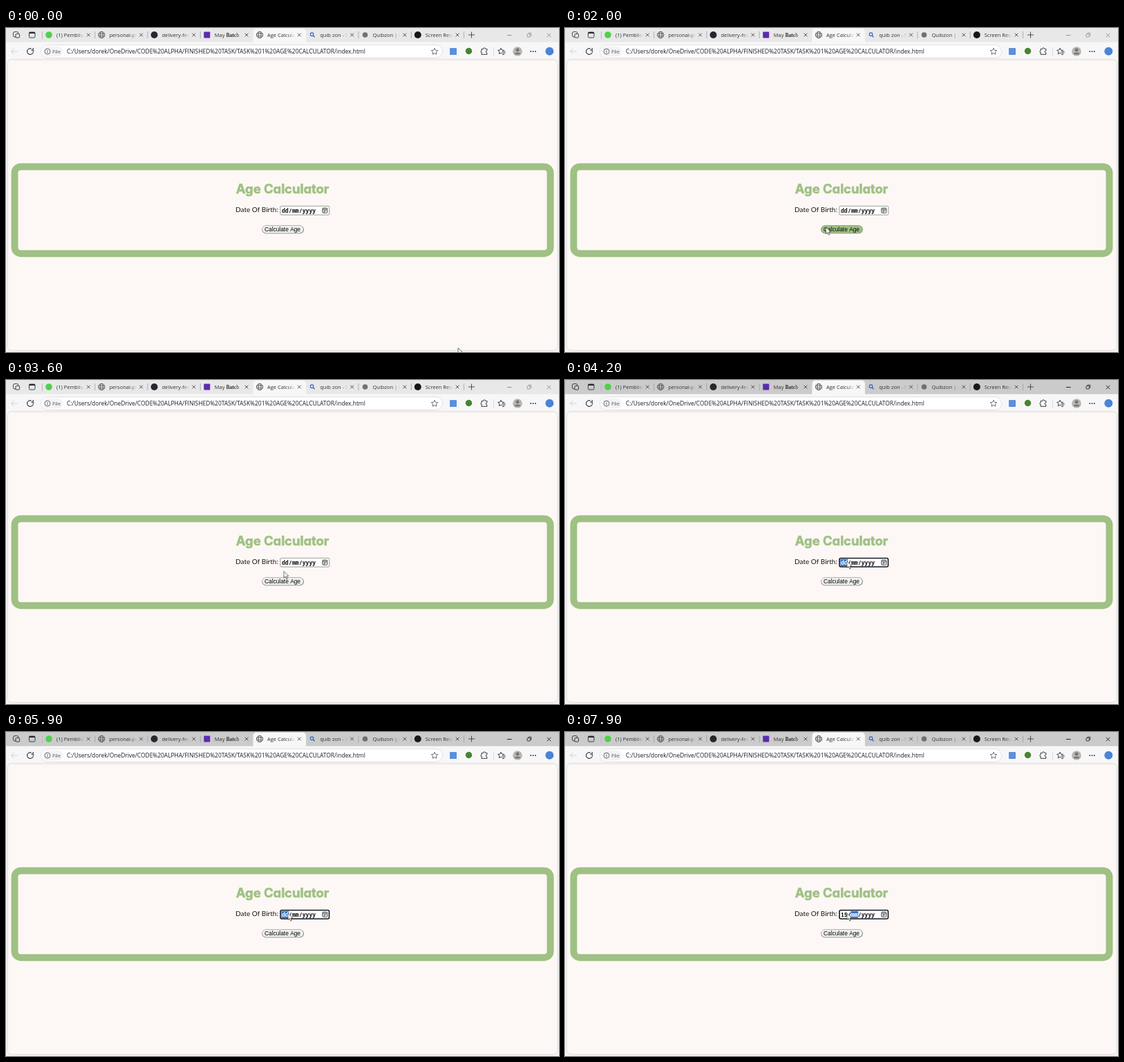
An HTML page with a canvas for the animation above (8 s loop, 800 px wide and 470 px high).

```html
<!DOCTYPE html>
<html lang="en">
<head>
<meta charset="utf-8">
<title>Age Calculator</title>
<style>
html, body { margin: 0; width: 100%; height: 100%; overflow: hidden; background: #f7f7f7; }
canvas { display: block; width: 800px; height: 470px; }
h1 {
  position: absolute; left: 0; top: 221px; width: 800px; margin: 0;
  font: 700 18.4px/24px Inter, "Open Sans", sans-serif;
  font-feature-settings: "cv11", "ss03";
  color: #9fc184; -webkit-text-stroke: 0.6px #9fc184; text-align: center;
}
</style>
</head>
<body>
<canvas id="stage"></canvas>
<h1>Age Calculator</h1>
<script>
const LOOP = 8000, STEP = 100;
const FOCUS_AT = 4000, FIRST_KEY = 7300, SECOND_KEY = 7600;
const UI = '"Open Sans", "Noto Sans", sans-serif';
const MONO = '"Noto Sans Mono", "DejaVu Sans Mono", monospace';
const GREEN = '#9fc184', PAGE = '#fdf8f5', BAR = '#f7f7f7', INK = '#2b2b2b';

const canvas = document.getElementById('stage');
const c = canvas.getContext('2d');
const dpr = window.devicePixelRatio || 1;
canvas.width = 800 * dpr;
canvas.height = 470 * dpr;

function box(x, y, w, h, r, fill, stroke, lw = 1) {
  c.beginPath();
  c.roundRect(x, y, w, h, r);
  if (fill) { c.fillStyle = fill; c.fill(); }
  if (stroke) { c.strokeStyle = stroke; c.lineWidth = lw; c.stroke(); }
}

function disc(x, y, r, fill, stroke, lw = 1) {
  c.beginPath();
  c.arc(x, y, r, 0, Math.PI * 2);
  if (fill) { c.fillStyle = fill; c.fill(); }
  if (stroke) { c.strokeStyle = stroke; c.lineWidth = lw; c.stroke(); }
}

// Each argument after the width is one polyline: [x0, y0, x1, y1, ...]
function lines(color, lw, ...paths) {
  c.strokeStyle = color;
  c.lineWidth = lw;
  c.beginPath();
  for (const p of paths) {
    c.moveTo(p[0], p[1]);
    for (let i = 2; i < p.length; i += 2) c.lineTo(p[i], p[i + 1]);
  }
  c.stroke();
}

function text(str, x, y, font, color, align = 'left') {
  c.font = font;
  c.fillStyle = color;
  c.textAlign = align;
  c.fillText(str, x, y);
}

function cross(x, y, r, color, lw) {
  lines(color, lw, [x - r, y - r, x + r, y + r], [x + r, y - r, x - r, y + r]);
}

function globe(x, y) {
  disc(x, y, 4.6, null, '#4a4a4a', 0.9);
  c.beginPath();
  c.ellipse(x, y, 2, 4.6, 0, 0, Math.PI * 2);
  c.stroke();
  lines('#4a4a4a', 0.8, [x - 4.2, y - 1.6, x + 4.2, y - 1.6], [x - 4.2, y + 1.6, x + 4.2, y + 1.6]);
}

function lens(x, y) {
  disc(x - 0.7, y - 0.8, 2.3, null, '#2468c4', 1.1);
  lines('#2468c4', 1.3, [x + 1, y + 1, x + 3.2, y + 3.2]);
}

function star(x, y, r, color) {
  c.beginPath();
  for (let i = 0; i < 10; i++) {
    const a = i * Math.PI / 5 - Math.PI / 2, q = i % 2 ? r * 0.48 : r;
    c.lineTo(x + q * Math.cos(a), y + q * Math.sin(a));
  }
  c.closePath();
  c.strokeStyle = color;
  c.lineWidth = 0.9;
  c.stroke();
}

const dot = (color, r) => (x, y) => disc(x, y, r, color);

const tabs = [
  ['(1) Pemblio', dot('#4fd14b', 4.8)],
  ['personal-portfolio', globe],
  ['delivery-fee', dot('#24292f', 5)],
  ['May ', (x, y) => box(x - 4.5, y - 4.5, 9, 9, 1, '#5b2bb0'), 'Batch'],
  ['Age Calculator', globe],
  ['quib zon - Search', lens],
  ['Quibzon | Chat', dot('#707070', 3.8)],
  ['Screen Recorder', dot('#171717', 5)]
];

function tabStrip(focused) {
  const strip = focused ? '#cbcbcb' : '#e8e8e8';
  c.fillStyle = strip;
  c.fillRect(0, 0, 800, 21);

  box(10.5, 5.5, 7.5, 7.5, 2.4, null, INK, 0.9);
  box(14, 8.5, 5.6, 5.6, 1.3, strip, INK, 0.9);
  box(33.5, 6, 8.5, 8, 1.5, null, INK, 0.9);
  c.fillStyle = INK;
  c.fillRect(33.5, 6, 8.5, 2);
  lines('#b0b0b0', 0.8, [52.5, 5, 52.5, 16]);

  box(357.5, 0.5, 76.5, 26, 5, BAR);

  tabs.forEach(([label, icon, bold], i) => {
    const x = 62 + i * 76.25, tx = x + 11;
    icon(x, 10);
    c.save();
    c.beginPath();
    c.rect(tx, 0, 40, 20);
    c.clip();
    const fade = c.createLinearGradient(tx + 30, 0, tx + 40, 0);
    fade.addColorStop(0, '#303030');
    fade.addColorStop(1, 'rgba(48,48,48,0)');
    text(label, tx, 13, '7.5px ' + UI, fade);
    if (bold) text(bold, tx + c.measureText(label).width, 13, 'bold 7.6px "Liberation Serif", serif', fade);
    c.restore();
    cross(x + 57.3, 10, 2.4, '#333', 0.8);
    if (i !== 3 && i !== 4) lines('#a0a0a0', 0.8, [x + 66.7, 5, x + 66.7, 15]);
  });

  lines(INK, 0.8, [669, 10, 678, 10], [673.5, 5.5, 673.5, 14.5]);
  const ctl = focused ? '#111' : '#8a8a8a';
  lines(ctl, 0.9, [725, 10.5, 731.5, 10.5]);
  box(754, 8.7, 4.3, 4.3, 0.8, null, ctl, 0.8);
  lines(ctl, 0.8, [755.5, 7.3, 759.7, 7.3, 759.7, 11.6]);
  cross(785.5, 10.5, 2.7, ctl, 0.9);
}

function toolbar() {
  lines('#cfcfcf', 1, [17, 34, 7.5, 34], [11.5, 30, 7.5, 34, 11.5, 38]);
  c.beginPath();
  c.arc(35, 34, 4.4, -0.5, 5.1);
  c.strokeStyle = INK;
  c.lineWidth = 1.1;
  c.stroke();
  lines(INK, 1.1, [39.2, 29, 39.2, 32, 36.2, 32]);

  box(50.5, 24.5, 581, 19, 9.5, '#fff', '#dedede', 0.9);
  box(53, 26.5, 29.5, 15, 7.5, '#f3f3f3');
  disc(60, 34, 4, null, '#4d4d4d', 0.8);
  lines('#4d4d4d', 0.9, [60, 33.4, 60, 36.2], [60, 31.6, 60, 32.5]);
  text('File', 67, 36.8, '7.6px ' + UI, '#555');
  text('C:/Users/dorek/OneDrive/CODE%20ALPHA/FINISHED%20TASK/TASK%201%20AGE%20CALCULATOR/index.html',
    88, 37, '8.42px ' + UI, '#1c1c1c');
  star(620, 34.2, 5, '#606060');

  box(642, 29, 10, 10, 1, '#5b8fe0');
  disc(669.5, 33.5, 4.7, '#45852f');
  // Extensions piece
  c.beginPath();
  c.moveTo(688, 30.5);
  c.lineTo(690.6, 30.5);
  c.arc(692, 30.2, 1.4, Math.PI, 0);
  c.lineTo(696, 30.5);
  c.lineTo(696, 32.8);
  c.arc(695.6, 34.2, 1.4, -Math.PI / 2, Math.PI / 2, true);
  c.lineTo(696, 38.3);
  c.lineTo(688, 38.3);
  c.lineTo(688, 35.6);
  c.arc(688.3, 34.2, 1.4, Math.PI / 2, -Math.PI / 2);
  c.closePath();
  c.strokeStyle = INK;
  c.lineWidth = 0.9;
  c.stroke();

  lines('#d0d0d0', 0.8, [705.5, 28, 705.5, 40]);
  star(716, 33.8, 4.6, INK);
  c.fillStyle = BAR;
  c.fillRect(717.6, 33.4, 6, 6);
  lines(INK, 0.9, [718, 34, 722.5, 34], [718, 36.2, 722.5, 36.2], [718, 38.4, 721, 38.4]);

  disc(740, 34, 6.8, '#b9b7b5');
  disc(740, 31.8, 2.5, '#777');
  c.beginPath();
  c.ellipse(740, 38.3, 4.3, 2.7, 0, Math.PI, 0);
  c.fill();
  for (let i = -1; i < 2; i++) disc(762.5 + i * 3.4, 34, 0.9, INK);
  disc(786.3, 33.8, 6, '#4b83d8');
}

function dateField(t) {
  const focused = t >= FOCUS_AT;
  const done = t >= SECOND_KEY;
  const day = done ? '15' : t >= FIRST_KEY ? '01' : 'dd';
  const font = '600 8px ' + MONO;
  if (focused) box(397, 258.5, 70.5, 12.5, 2, '#fff', '#151a20', 1.6);
  else box(396.8, 258.3, 71, 12.8, 1.5, '#fff', '#858585', 0.8);

  const part = (str, x, on) => {
    if (on) {
      c.fillStyle = '#3577cf';
      c.fillRect(x - 0.6, 259.6, str.length * 4.8 + 1.2, 10.4);
    }
    text(str, x, 267.7, font, on ? '#fff' : '#101010');
  };
  part(day, 399, focused && !done);
  part('/', 409, false);
  part('mm', 414, done);
  part('/', 424, false);
  part('yyyy', 428.8, false);

  box(457.8, 261.2, 7, 7, 1, null, '#333', 0.9);
  lines('#333', 0.9, [458, 263, 464.6, 263], [459.4, 264.8, 463.4, 264.8], [459.4, 266.4, 462, 266.4]);
}

function button(hover) {
  box(370.3, 286.3, 60.6, 12, 6, hover ? '#8f9b88' : '#777');
  box(370.6, 286.4, 59.5, 11, 5.5, hover ? '#7d9a69' : '#d2d2d2');
  box(371.1, 287, 58.7, 10.2, 5.1, hover ? GREEN : '#efefef');
  text('Calculate Age', 400, 294.9, '8.35px "Liberation Sans", Arial, sans-serif', '#080808', 'center');
}

function page(t, hover) {
  c.save();
  c.shadowColor = 'rgba(0,0,0,0.22)';
  c.shadowBlur = 3 * dpr;
  box(3, 46.5, 794.5, 420.5, 5, PAGE);
  c.restore();
  box(12.5, 201.2, 775, 126, 9, null, GREEN, 10);
  text('Date Of Birth:', 332, 267.3, '10px Lato, "Open Sans", sans-serif', '#151515');
  dateField(t);
  button(hover);
}

// Pointer stops: time, x, y
const stops = [
  [0, 654, 464], [700, 418.5, 249.5], [1000, 418.5, 249.5], [1800, 377.5, 289],
  [2700, 377.5, 289], [3500, 402, 277.5], [3600, 402, 277.5], [3900, 408, 263], [LOOP, 408, 263]
];

function pointerAt(t) {
  let i = 0;
  while (i < stops.length - 2 && t >= stops[i + 1][0]) i++;
  const [t0, x0, y0] = stops[i], [t1, x1, y1] = stops[i + 1];
  const k = (t - t0) / (t1 - t0), e = k * k * (3 - 2 * k);
  return [x0 + (x1 - x0) * e, y0 + (y1 - y0) * e];
}

function pointer(x, y) {
  const overText = x > 18 && x < 782 && y > 222 && y < 257;
  if (overText) {
    lines('#202020', 1, [x - 2.6, y - 5, x + 2.6, y - 5], [x, y - 5, x, y + 5], [x - 2.6, y + 5, x + 2.6, y + 5]);
    return;
  }
  c.save();
  c.translate(x, y);
  c.beginPath();
  const tip = [0, 0, 0, 9.6, 2.2, 7.6, 3.8, 11.2, 5.4, 10.5, 3.9, 7, 6.8, 6.8];
  for (let i = 0; i < tip.length; i += 2) c.lineTo(tip[i], tip[i + 1]);
  c.closePath();
  c.fillStyle = '#fff';
  c.fill();
  c.strokeStyle = '#333';
  c.lineWidth = 0.7;
  c.stroke();
  c.restore();
}

function draw(t) {
  const [x, y] = pointerAt(t);
  const hover = x > 370 && x < 431 && y > 286 && y < 298.5;
  c.setTransform(dpr, 0, 0, dpr, 0, 0);
  c.fillStyle = BAR;
  c.fillRect(0, 0, 800, 470);
  tabStrip(t >= FOCUS_AT);
  c.fillStyle = BAR;
  c.fillRect(0, 20.5, 800, 26);
  toolbar();
  page(t, hover);
  pointer(x, y);
}

const start = performance.now();
function tick() {
  const t = (performance.now() - start) % LOOP;
  draw(Math.floor(t / STEP) * STEP);
  requestAnimationFrame(tick);
}
tick();
</script>
</body>
</html>
```
